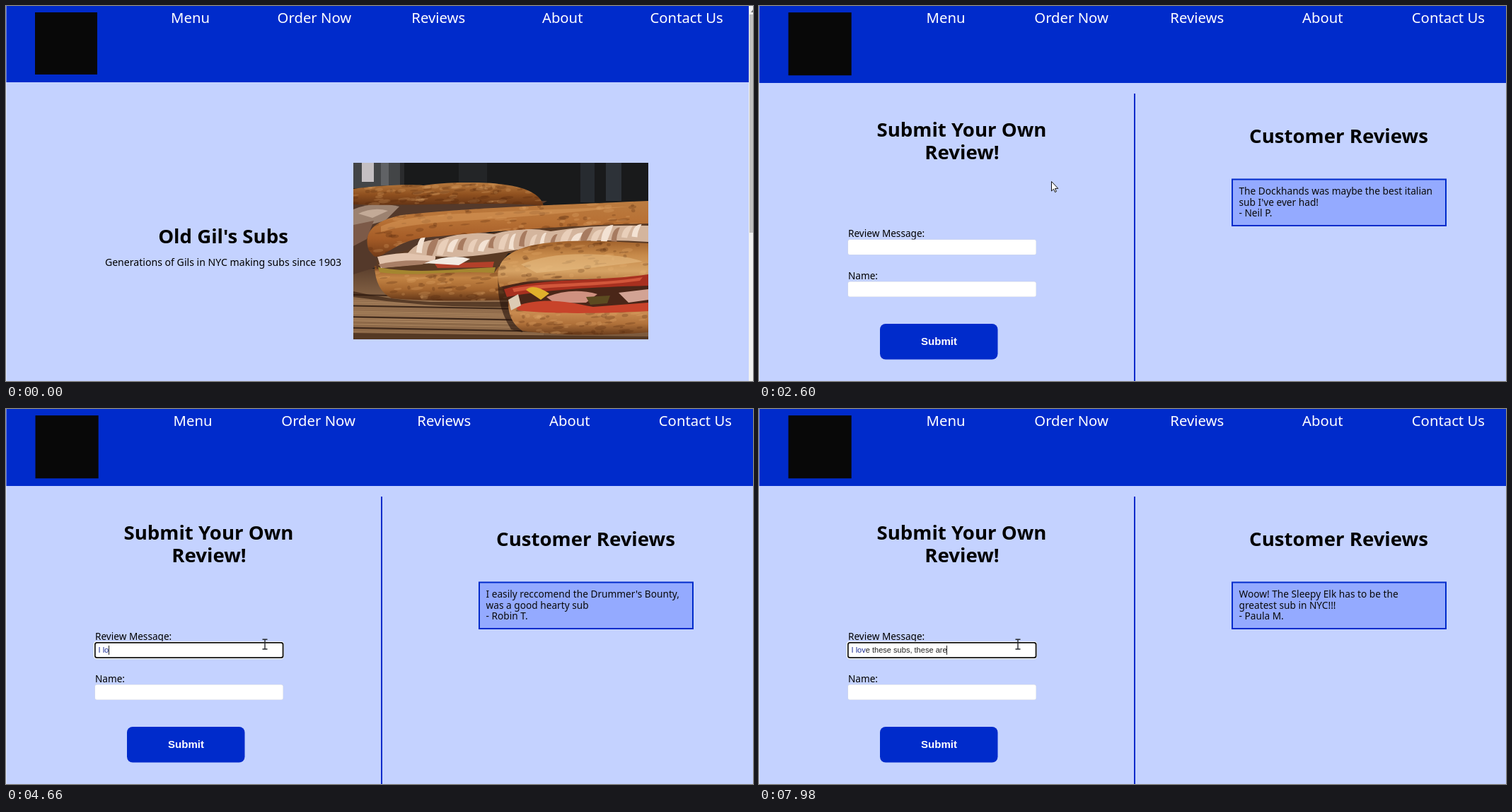
Write an HTML page with a canvas that moves like this. It is 1056 px wide and 531 px high and loops after 8 s.

```html
<!DOCTYPE html>
<html lang="en">
<head>
<meta charset="utf-8">
<title>Sub shop reviews</title>
<style>
  html, body { margin: 0; width: 100%; height: 100%; overflow: hidden; background: #c4d2ff; }
  canvas { display: block; }
</style>
</head>
<body>
<canvas id="stage" width="1056" height="531"></canvas>
<script>
const ctx = document.getElementById('stage').getContext('2d');
const W = 1056, H = 531, LOOP = 8000;
const BLUE = '#002bcb', PALE = '#c4d2ff';

const SANS = '"Noto Sans", "Open Sans", sans-serif';
const ARIAL = '"Liberation Sans", Arial, sans-serif';
const FONT = {
  nav: `500 20.3px ${SANS}`,
  title: `bold 27.6px ${SANS}`,
  body: `14.1px ${SANS}`,
  review: `13.7px ${SANS}`,
  label: `13.6px ${SANS}`,
  button: `bold 15px ${ARIAL}`,
  field: `11.05px ${ARIAL}`,
  hint: `10.25px "Open Sans", "Noto Sans", sans-serif`
};

const NAV = ['Menu', 'Order Now', 'Reviews', 'About', 'Contact Us'];
const REVIEWS = [
  ['The Dockhands was maybe the best italian', "sub I've ever had!", '- Neil P.'],
  ["I easily reccomend the Drummer's Bounty,", 'was a good hearty sub', '- Robin T.'],
  ['Woow! The Sleepy Elk has to be the', 'greatest sub in NYC!!!', '- Paula M.']
];
const HINTS = [
  "I absolutely love these subs, the best sandwich I've ever had!",
  "I easily reccomend the Drummer's Bounty, was a good hearty sub",
  "The Dockhands was maybe the best italian sub I've ever had!",
  'Woow! The Sleepy Elk has to be the greatest sub in NYC!!!',
  'Great bread and a very friendly counter',
  'Best lunch in town'
];

// Event times in ms
const PAGE_AT = 2400, FOCUS_AT = 3380, FILTER_AT = 4370, HINTS_END = 4600;
const REVIEW_AT = [0, 4600, 6630];
const MESSAGE = 'I love these subs, these are';
const KEYS = [4310, 4520, 4600, 4660, 4800, 4940, 5010, 5080, 5220, 5290, 5350, 5490, 5560, 5760,
  5830, 5890, 6030, 6490, 6690, 6760, 6820, 6960, 7030, 7500, 7700, 7790, 7890, 7980];

// Pointer path: time, x, y
const PATH = [
  [180, 918, 500], [400, 860, 360], [620, 700, 150], [780, 558, 52], [920, 590, 34],
  [1200, 580, 20], [1600, 580, 20], [1660, 580, 17], [1920, 580, 17], [2060, 575, 30],
  [2260, 562, 62], [2400, 530, 110], [2600, 413, 248], [2670, 383, 316],
  [2730, 372, 327], [2860, 366, 332], [3130, 366, 333]
];

function text(str, x, y, font, color = '#000', align = 'left') {
  ctx.font = font;
  ctx.fillStyle = color;
  ctx.textAlign = align;
  ctx.fillText(str, x, y);
}

function rect(x, y, w, h, color) {
  ctx.fillStyle = color;
  ctx.fillRect(x, y, w, h);
}

function round(x, y, w, h, r, color) {
  ctx.beginPath();
  ctx.roundRect(x, y, w, h, r);
  ctx.fillStyle = color;
  ctx.fill();
}

function shape(d, fill) {
  ctx.fillStyle = fill;
  ctx.fill(new Path2D(d));
}

function fade(y0, y1, ...colors) {
  const g = ctx.createLinearGradient(0, y0, 0, y1);
  colors.forEach((c, i) => g.addColorStop(i / (colors.length - 1), c));
  return g;
}

function seeded(seed) {
  return () => (seed = (seed * 16807) % 2147483647) / 2147483647;
}

// A crust: shaded shape with soft light and dark flecks
function crust(d, [x, y, w, h], colors, seed) {
  const rnd = seeded(seed);
  ctx.save();
  ctx.clip(new Path2D(d));
  rect(x, y, w, h, fade(y, y + h, ...colors));
  for (let i = 0; i < w / 2; i++) {
    ctx.fillStyle = rnd() < 0.5 ? 'rgba(70,30,8,.22)' : 'rgba(240,185,120,.2)';
    ctx.beginPath();
    ctx.ellipse(x + rnd() * w, y + rnd() * h, 2 + rnd() * 7, 1 + rnd() * 2, -0.1, 0, 7);
    ctx.fill();
  }
  ctx.restore();
}

function header(height, logoScale, first, step) {
  rect(0, 0, W, H, PALE);
  rect(0, 0, W, height, BLUE);
  rect(41 * logoScale, 9 * logoScale, 88 * logoScale, 88 * logoScale, '#080808');
  NAV.forEach((label, i) => text(label, first + i * step, 24, FONT.nav, '#fff', 'center'));
}

function backdrop() {
  rect(491, 222, 417, 250, '#191a1b');
  rect(491, 222, 70, 36, '#434547');
  rect(503, 222, 17, 27, '#c4bfc2');
  rect(530, 222, 11, 32, '#606265');
  rect(557, 222, 6, 34, '#2a2b2d');
  rect(640, 222, 40, 40, '#232527');
  rect(812, 222, 20, 56, '#272b30');
  rect(848, 222, 22, 54, '#2d3238');
}

function table() {
  const rnd = seeded(23);
  rect(491, 372, 417, 100, fade(372, 472, '#5d412e', '#8f6b4b', '#7b583b'));
  for (let i = 0; i < 26; i++) {
    const y = 408 + i * 2.6, dark = i % 6 === 0;
    shape(`M491 ${y} L760 ${y + 5} V${y + 7} L491 ${y + 2}Z`,
      dark ? '#3f291b' : `rgba(205,165,120,${0.1 + rnd() * 0.4})`);
  }
  shape('M491 404 Q540 416 600 419 H712 V426 Q600 428 491 412Z', 'rgba(45,24,12,.6)');
  shape('M491 463 L908 468 V472 H491Z', '#553924');
}

function rearSub() {
  shape('M491 276 H765 L700 315 L491 380Z', '#54392a');
  shape('M491 288 Q520 276 556 284 L536 304 L491 316Z', '#9c8270');
  shape('M491 310 L520 304 L510 330 L491 340Z', '#7c5a48');
  shape('M498 294 Q520 284 540 290 L518 300Z', '#c3aa97');
  crust('M491 259 C520 255 560 252 590 254 C650 246 710 250 735 260 Q756 268 760 283 C690 276 570 284 491 281Z',
    [491, 250, 270, 34], ['#b77a3e', '#8f501f', '#5f3013'], 5);
}

function middleSub() {
  crust('M521 368 C580 382 650 372 710 368 L710 416 C650 418 590 418 545 414 Q522 402 521 368Z',
    [521, 368, 190, 50], ['#8d5427', '#c38444', '#a5662f', '#5e3317'], 11);
  shape('M524 360 C600 330 720 312 908 300 V350 H710 L690 378 C640 370 580 384 524 372Z', '#5a3a24');
  shape('M526 370 C580 380 640 372 692 370 L690 378 C630 374 575 384 528 377Z', '#a4862f');
  shape('M606 365 L690 362 L688 370 L610 371Z', '#b3402a');
  shape('M525 355 Q570 346 606 352 Q612 364 590 365 L530 371Z', '#e2c4ae');
  shape('M526 366 Q560 358 600 361 L588 366 L532 371Z', '#a97f66');
  shape('M592 364 Q630 350 656 358 L640 367Z', '#f2eae2');
  shape('M568 350 Q584 330 612 331 Q650 317 690 323 Q730 311 770 319 Q830 309 908 311 V334 Q820 328 750 340 Q700 350 660 354 Q620 358 568 350Z', '#d4b59d');
  const rnd = seeded(41);
  for (let i = 0; i < 22; i++) {
    const x = 580 + i * 14.5, y = 342 - i * 1.1 + rnd() * 6;
    const lean = 4 + rnd() * 9, rise = 8 + rnd() * 9;
    shape(`M${x} ${y + 7} Q${x + 2} ${y - rise} ${x + lean + 6} ${y - rise} Q${x + lean} ${y} ${x + 8} ${y + 8}Z`,
      ['#f3e2d3', '#a77b60', '#e9cfba'][i % 3]);
  }
  crust('M513 346 C504 320 520 304 560 296 C650 286 770 282 908 276 V308 C790 310 660 322 590 328 C548 334 532 360 520 354Z',
    [506, 276, 402, 80], ['#bb7c40', '#b87236', '#a55c27', '#703a18'], 17);
  shape('M530 312 Q560 298 640 294 Q760 288 880 284 Q770 296 650 304 Q570 308 530 320Z', 'rgba(222,160,95,.45)');
}

function frontSub() {
  shape('M697 372 Q690 420 714 458 L730 462 V372Z', 'rgba(35,18,10,.6)');
  crust('M710 414 C730 430 830 424 908 422 V462 C840 468 770 466 730 460 Q708 446 710 414Z',
    [708, 418, 200, 48], ['#9d5c2c', '#c98b50', '#b0713a', '#6c3d1c'], 29);
  shape('M700 392 L908 384 V430 H730 Q705 420 700 392Z', '#4a2618');
  shape('M704 401 C760 384 830 392 908 378 V396 C830 398 760 402 708 412Z', '#a8301f');
  shape('M716 400 C770 390 830 395 900 384 L896 389 C830 398 770 396 718 405Z', '#d2563a');
  shape('M735 402 Q745 392 768 407 L756 416Z', '#e0b02b');
  shape('M764 412 Q800 398 836 408 L820 420 L776 421Z', '#cf9180');
  shape('M866 406 L908 401 V416 L880 420Z', '#d2a394');
  shape('M820 412 L854 410 L850 421 L826 423Z', '#5c4a20');
  shape('M720 425 C760 412 790 418 830 426 L908 420 V432 C830 436 770 436 724 431Z', '#c8432a');
  shape('M710 416 L724 408 L728 424 L714 431Z', '#dccbb4');
  crust('M698 398 C688 364 706 344 760 336 C810 329 860 334 908 336 V380 C840 390 780 385 742 389 Q715 394 698 398Z',
    [692, 330, 216, 68], ['#9c5c27', '#c78a4a', '#d6a365', '#a8672f'], 37);
  shape('M728 366 Q770 348 840 352 Q880 354 900 362 Q820 372 750 378Z', 'rgba(236,196,138,.5)');
}

function photo() {
  ctx.save();
  ctx.beginPath();
  ctx.rect(491, 222, 417, 250);
  ctx.clip();
  backdrop();
  table();
  rearSub();
  middleSub();
  frontSub();
  ctx.restore();
}

function home() {
  header(108, 1, 260.5, 175.4);
  text("Old Gil's Subs", 307, 336, FONT.title, '#000', 'center');
  text('Generations of Gils in NYC making subs since 1903', 307, 368, FONT.body, '#000', 'center');
  photo();
  rect(1050, 0, 6, H, '#f1f1f1');
  rect(1051, 12, 5, 309, '#c1c1c1');
  shape('M1053 9 L1056 5 V9Z', '#777');
}

function input(y, focused) {
  if (focused) {
    round(124, y - 2, 269, 25, 4, '#fff');
    round(125, y - 1, 267.5, 23, 3.5, '#101010');
    round(126.7, y + 0.7, 264, 19.6, 2, '#fff');
  } else {
    round(125.5, y - 0.5, 266.5, 22, 3, '#d3d8e6');
    round(126, y, 265.5, 21, 2.5, '#fff');
  }
}

function typed(t) {
  const count = KEYS.filter(k => k <= t).length;
  const str = MESSAGE.slice(0, count);
  const x = 130.5, y = 345, head = 'I lov';
  text(str.slice(0, head.length), x, y, FONT.field, '#1d2f96');
  if (count > head.length) {
    text(str.slice(head.length), x + ctx.measureText(head).width, y, FONT.field, '#222');
  }
  const last = count ? KEYS[count - 1] : FOCUS_AT;
  if (Math.floor((t - last) / 530) % 2 === 0) {
    rect(Math.floor(x + ctx.measureText(str).width), 335, 1, 13, '#222');
  }
}

function hints(list) {
  ctx.save();
  ctx.shadowColor = 'rgba(0,0,0,.35)';
  ctx.shadowBlur = 4;
  ctx.shadowOffsetY = 1;
  round(208, 360, 341, 7 + list.length * 30, 4, '#1b1d1e');
  ctx.restore();
  shape('M218 361 L226 353 L234 361Z', '#1b1d1e');
  list.forEach((line, i) => text(line, 218, 383 + i * 30, FONT.hint, '#f4f4f4'));
}

function reviews(t) {
  const focused = t >= FOCUS_AT;
  header(109, 1.013, 264, 177.6);
  rect(530, 124, 2, H - 124, BLUE);

  text('Submit Your Own', 286.5, 185, FONT.title, '#000', 'center');
  text('Review!', 287, 217, FONT.title, '#000', 'center');
  text('Review Message:', 126, 327, FONT.label);
  input(331, focused);
  text('Name:', 126, 387, FONT.label);
  input(390.5, false);
  round(171, 450, 166.5, 50.5, 8, BLUE);
  text('Submit', 254.5, 480, FONT.button, '#fff', 'center');

  text('Customer Reviews', 819.5, 194, FONT.title, '#000', 'center');
  rect(668, 244.5, 304, 67.5, BLUE);
  rect(670, 246.5, 300, 63.5, '#94aaff');
  const current = REVIEWS[REVIEW_AT.filter(at => at <= t).length - 1];
  current.forEach((line, i) => text(line, 678.5, 267 + i * 15.6, FONT.review, '#0a0a0a'));

  if (focused) typed(t);
  if (focused && t < HINTS_END) hints(t < FILTER_AT ? HINTS : HINTS.slice(0, 2));
}

function outlined(d) {
  const p = new Path2D(d);
  ctx.lineJoin = 'round';
  ctx.lineWidth = 1;
  ctx.strokeStyle = '#111';
  ctx.fillStyle = '#fff';
  ctx.fill(p);
  ctx.stroke(p);
}

function pointer(t) {
  if (t < PATH[0][0]) return;
  // The pointer advances in 68 ms ticks.
  const tick = Math.max(PATH[0][0], 1920 + Math.floor((t - 1920) / 68) * 68);
  let i = 0;
  while (i < PATH.length - 2 && PATH[i + 1][0] <= tick) i++;
  const [t0, x0, y0] = PATH[i], [t1, x1, y1] = PATH[i + 1];
  const k = Math.min(1, (tick - t0) / (t1 - t0));

  ctx.save();
  ctx.translate(x0 + (x1 - x0) * k, y0 + (y1 - y0) * k);
  if (t >= 2730) {
    ctx.lineWidth = 1.4;
    ctx.strokeStyle = '#25282f';
    ctx.stroke(new Path2D('M-3.5 -6.8 H3.5 M0 -6.8 V7 M-3.5 7 H3.5'));
  } else if (t >= 1060 && t < 1990) {
    outlined('M0 .5 Q1.5 -1 2.5 .5 V6 L8 7 Q10 7.5 9.8 10 L8.5 16 H1.5 L-3.5 9.5 Q-3 7.5 -1.5 8.5 L0 10Z');
  } else {
    outlined('M.5 .5 V14 L3.5 11.2 L5.5 15.6 L7.4 14.7 L5.5 10.4 H9.8Z');
  }
  ctx.restore();
}

function draw() {
  const t = performance.now() % LOOP;
  if (t < PAGE_AT) home();
  else reviews(t);
  rect(0, 0, 1, H, 'rgba(255,255,255,.4)');
  pointer(t);
  requestAnimationFrame(draw);
}
draw();
</script>
</body>
</html>
```
